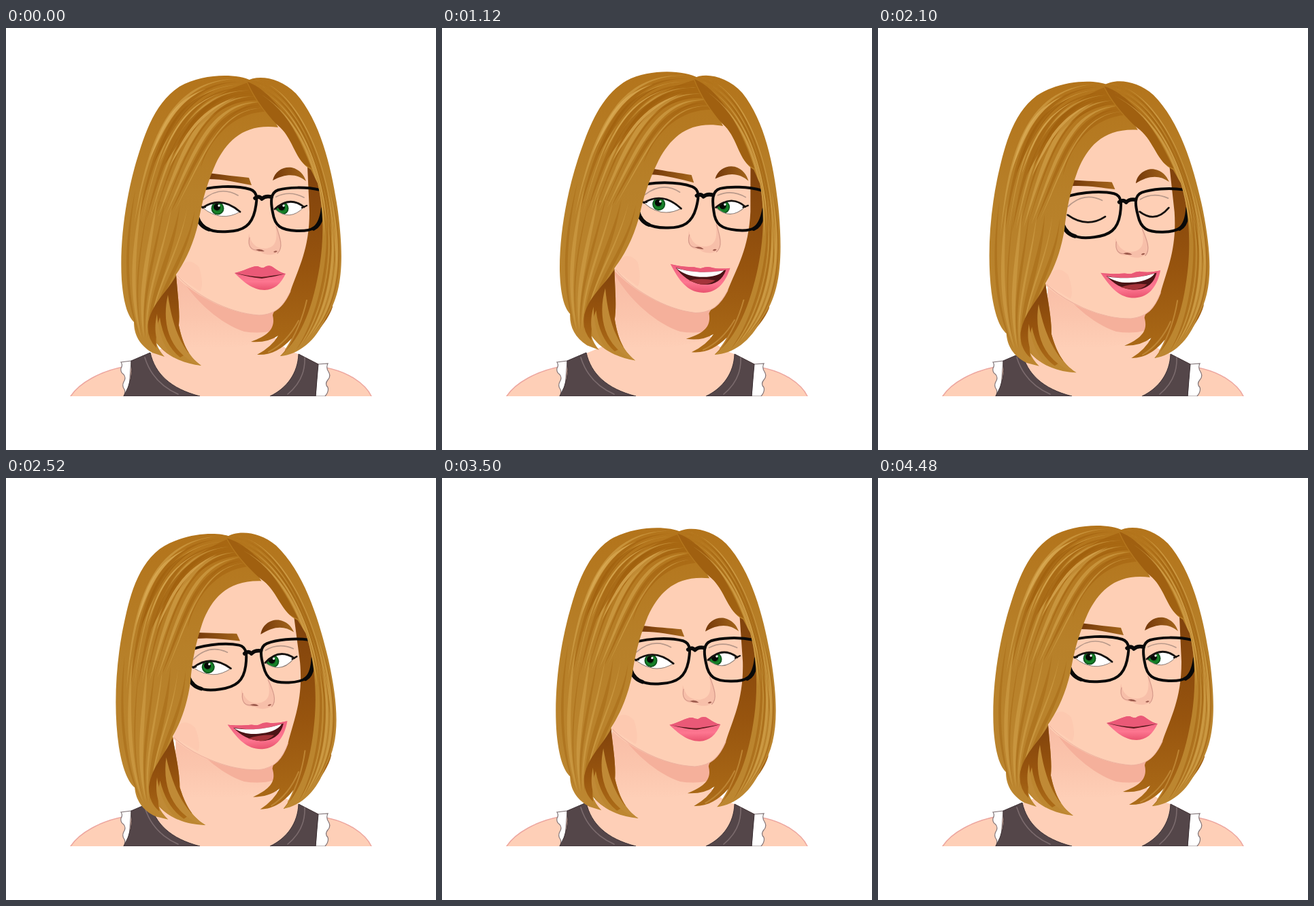
An HTML page for the animation above (5.25 s loop, 632x620 px).

```html
<!DOCTYPE html>
<html lang="en">
<head>
<meta charset="utf-8">
<title>Portrait</title>
<style>
html, body { margin: 0; height: 100%; overflow: hidden; background: #fff; }
svg { display: block; width: 100vw; height: 100vh; }
.line { fill: none; stroke-linecap: round; stroke-linejoin: round; }
</style>
</head>
<body>
<svg viewBox="0 0 632 620">
  <defs>
    <linearGradient id="hair" x1="0" y1="0" x2="0" y2="1">
      <stop offset="0" stop-color="#b3741b"/><stop offset=".4" stop-color="#b78029"/><stop offset="1" stop-color="#bd8731"/>
    </linearGradient>
    <linearGradient id="under" x1="0" y1="0" x2="0" y2="1">
      <stop offset="0" stop-color="#7f410c"/><stop offset=".55" stop-color="#97540e"/><stop offset="1" stop-color="#ac6c18"/>
    </linearGradient>
    <linearGradient id="brow"><stop offset="0" stop-color="#74380a"/><stop offset="1" stop-color="#a4661b"/></linearGradient>
    <linearGradient id="neck" x1="0" y1="0" x2="0" y2="1">
      <stop offset="0" stop-color="#f8bba4"/><stop offset=".6" stop-color="#fbc5ad"/><stop offset="1" stop-color="#fecfb7"/>
    </linearGradient>
    <linearGradient id="lip" x1="0" y1="0" x2="0" y2="1">
      <stop offset="0" stop-color="#f0617f"/><stop offset=".65" stop-color="#fd7690"/><stop offset="1" stop-color="#e9536f"/>
    </linearGradient>
    <radialGradient id="iris"><stop offset="0" stop-color="#0a3d14"/><stop offset=".65" stop-color="#178a2b"/><stop offset="1" stop-color="#0b4517"/></radialGradient>
    <path id="leftLock" d="M360,77C340,67 290,66 255,86C215,112 201,165 189,205C174,260 167,320 170,370C173,410 181,425 188,432C188,450 196,466 215,477L233,483Q224,473 221,463C235,480 257,493 287,496C266,481 259,460 254,437C256,415 252,390 250,362C262,345 275,320 283,285C288,255 295,230 308,200C325,165 350,140 400,146C390,125 372,108 360,77Z"/>
    <path id="rightLock" d="M353,78C370,68 402,72 426,96C465,140 480,215 488,270C497,340 495,390 470,426C455,460 430,480 403,482C436,455 452,405 461,350C468,305 466,262 458,228L448,208C425,195 423,165 403,146C385,130 368,112 353,78Z"/>
    <clipPath id="leftClip"><use href="#leftLock"/></clipPath>
    <clipPath id="rightClip"><use href="#rightLock"/></clipPath>
    <clipPath id="eyeClipL"><path id="eyeShapeL"/></clipPath>
    <clipPath id="eyeClipR"><path id="eyeShapeR"/></clipPath>
  </defs>

  <g id="body">
    <path fill="#fecfb7" d="M95,541C108,521 140,504 172,498L212,478L250,462V350H393V450Q402,470 430,479L470,499C502,505 528,522 537,541Z"/>
    <path fill="url(#neck)" d="M250,352H394V455C350,472 285,475 248,466Z"/>
    <path fill="#f5b09b" d="M250,355C272,398 315,435 350,446Q375,450 394,444V400Z"/>
    <path class="line" stroke="#eda7a0" stroke-width="1.5" d="M95,541C108,521 140,504 172,498M470,499C502,505 528,522 537,541"/>
    <path fill="#fff" stroke="#817477" stroke-width="1.2" d="M184,489L169,491Q172,495 169,500Q168,506 173,509Q177,514 173,520Q170,526 174,531Q176,536 173,541H180ZM458,494L473,493Q470,499 474,505Q478,512 473,517Q468,523 473,528Q475,534 469,541H455Z"/>
    <path fill="#544649" stroke="#3c3034" d="M184,489L212,477C219,508 242,530 285,541H173Q188,515 184,489ZM430,479L459,494Q457,515 455,541H388C413,529 429,507 430,479Z"/>
    <path class="line" stroke="#7b6b6d" stroke-width="1.6" d="M204,484C212,510 228,527 253,538M439,484C440,506 431,524 414,538"/>
    <path fill="#fff" d="M60,541H570V580H60Z"/>
  </g>

  <g id="head">
    <path fill="url(#under)" d="M440,195C468,215 480,300 480,410C470,440 430,478 403,482Q415,470 420,456C405,472 390,481 369,480Q391,468 400,452Q384,463 360,461C388,451 396,440 392,422C400,400 440,340 444,270Z"/>
    <path fill="#fecfb5" d="M245,360C270,388 322,419 372,422C396,421 408,409 418,387C430,352 446,325 446,270L443,203C430,165 415,140 380,138C330,138 290,190 275,280Z"/>
    <path class="line" stroke="#eeb19f" d="M252,364C275,390 325,419 372,422C396,421 408,409 418,387"/>
    <path fill="#fabfa9" opacity=".4" d="M252,364C258,340 272,338 284,352C290,372 288,384 285,387Z"/>

    <path fill="url(#brow)" d="M297,213C320,216 340,218 357,220L361,231C340,227 320,222 297,222Z"/>
    <path fill="url(#brow)" d="M392,224C395,210 408,203 420,205C432,208 438,216 441,225C428,214 412,213 392,224Z"/>
    <g class="line" stroke="#b8998a" stroke-width="1.7">
      <path d="M290,252Q315,231 341,246"/><path d="M397,248Q417,238 438,249"/>
    </g>
    <g id="eyes"></g>

    <path fill="#f5b9a4" opacity=".7" d="M357,302C354,325 362,329 374,329C384,336 397,334 403,326C407,314 398,300 396,290C400,312 396,322 382,324C368,325 360,317 357,302Z"/>
    <path class="line" stroke="#d5998a" stroke-width="1.2" d="M358,308C355,320 360,326 368,326M397,291C403,308 408,323 399,331"/>
    <path fill="#9c5a4c" d="M367,326Q374,323 380,328Q373,329 367,326ZM393,329Q396,326 399,328Q396,331 393,329Z"/>

    <g id="mouth"></g>

    <g class="line" stroke="#090909" stroke-width="4">
      <path d="M275,242C299,231 339,231 359,237C371,241 369,254 366,268C361,290 349,298 326,299C299,301 284,294 279,268Q275,254 277,242"/>
      <path d="M462,238C440,233 414,234 400,238C388,242 389,256 392,271C395,291 404,297 427,298C450,299 461,295 465,265"/>
      <path stroke-width="5.5" d="M366,250Q372,246 376,251Q381,246 390,248M281,277Q284,291 298,296M464,277Q461,291 452,295"/>
    </g>

    <use href="#leftLock" fill="url(#hair)"/>
    <g clip-path="url(#leftClip)">
      <path fill="#a4630f" opacity=".75" d="M356,80Q368,92 373,107C335,103 285,130 243,190C270,120 310,95 356,80Z"/>
      <path fill="#a4630f" opacity=".55" d="M392,123C345,120 305,150 286,205C298,160 330,110 380,108Z"/>
      <g id="leftStrands"></g>
      <path fill="url(#under)" d="M252,360C238,388 217,400 209,432Q206,455 221,470Q219,445 226,425Q232,465 256,484L270,476Q256,440 252,360Z"/>
      <path fill="#c08a36" d="M238,392C228,435 240,480 290,498C264,480 246,450 238,392ZM222,420C215,450 222,475 250,488C232,470 224,450 222,420Z"/>
    </g>
    <use href="#rightLock" fill="url(#hair)"/>
    <g clip-path="url(#rightClip)">
      <path fill="#9c5a0d" opacity=".8" d="M355,79C385,90 420,130 449,206C420,195 410,150 400,145C386,128 368,109 355,79Z"/>
      <g id="rightStrands"></g>
    </g>
    <path class="line" stroke="#bd8433" stroke-width="2" d="M430,430Q413,462 386,476M442,400Q433,440 411,473"/>
  </g>
</svg>
<script>
const $ = id => document.getElementById(id);
const clamp = v => Math.max(0, Math.min(1, v));

// Blend two paths that have the same structure.
function mix(a, b, u) {
  const to = b.match(/-?[\d.]+/g);
  let i = 0;
  return a.replace(/-?[\d.]+/g, n => (+n + (to[i++] - n) * u).toFixed(2));
}

function add(parent, d, fill, extra = "") {
  parent.insertAdjacentHTML("beforeend", `<path d="${d}" fill="${fill}" ${extra}/>`);
  return parent.lastElementChild;
}

// Tapered strands spread between two guide curves: start, two controls, end.
function strands(id, from, to, count, light, width, alpha) {
  for (let i = 0; i < count; i++) {
    const u = (i + .4) / count;
    const [x0, y0, x1, y1, x2, y2, x3, y3] = mix(from, to, u).split(" ").map(Number);
    const w = width * (.65 + .35 * Math.sin(i * 2.4));
    add($(id), `M${x0},${y0}C${x1},${y1} ${x2},${y2} ${x3},${y3}C${x2 + w},${y2 + w / 2} ${x1 + w},${y1 + w / 2} ${x0},${y0}Z`,
      i % 2 === light ? "#dcae57" : "#9f5f0d", `opacity="${alpha}"`);
  }
}
strands("leftStrands", "340 73 245 72 205 150 186 290", "384 120 315 118 295 190 250 270", 11, 0, 8, .5);
strands("leftStrands", "290 88 240 105 225 140 207 195", "345 103 290 120 265 160 245 205", 5, 0, 9, .75);
strands("leftStrands", "186 235 165 330 172 400 196 455", "284 270 270 340 222 380 214 455", 9, 1, 8, .4);
strands("rightStrands", "364 75 420 78 482 190 488 370", "370 96 425 130 462 210 466 300", 7, 0, 7, .6);
strands("rightStrands", "478 235 498 330 490 400 455 445", "466 250 478 320 460 420 424 475", 7, 1, 6, .5);

// Eyes: the upper lid's control point drops onto the lower lid's.
const eyes = [
  { side: "L", a: "289,264", b: "344,270", x: 316, top: 246, low: 286, iris: 311, lash: "M293,263Q288,264 284,261" },
  { side: "R", a: "395,266", b: "438,263", x: 417, top: 246, low: 285, iris: 406, lash: "M435,264L442,261" }
];
for (const e of eyes) {
  $("eyes").insertAdjacentHTML("beforeend", `<g clip-path="url(#eyeClip${e.side})">
    <path fill="#fff" d="M${e.iris - 40},235h90v50h-90Z"/>
    <circle cx="${e.iris}" cy="265" r="9.5" fill="url(#iris)"/><circle cx="${e.iris - 1}" cy="263" r="5" fill="#050805"/>
    <circle cx="${e.iris + 2}" cy="261" r="1.7" fill="#fff"/></g>`);
  e.edge = add($("eyes"), `M${e.b}Q${e.x},${e.low} ${e.a}`, "none", 'stroke="#8a7c76" stroke-width="1"');
  e.lid = add($("eyes"), "", "none", 'stroke="#161210" stroke-width="2.8" stroke-linecap="round"');
  e.wing = add($("eyes"), e.lash, "none", 'stroke="#161210" stroke-width="2.4" stroke-linecap="round"');
}

// Mouth layers: [closed path, open path, fill].
const shutTop = "M336,360C350,357 362,349 370,350Q376,353 379,352Q384,348 390,350C398,355 404,360 411,361";
const openTop = "M332,352C345,355 357,355 367,355Q375,357 378,356Q385,353 391,354C400,356 410,356 420,354";
const shutLine = "M336,360C355,364 365,365 376,366C388,364 400,363 411,361";
const mouth = [
  [shutTop + "C404,376 394,385 380,385C362,385 348,372 336,360Z",
   openTop + "C414,376 402,392 380,392C358,391 346,376 332,352Z", "url(#lip)"],
  [shutTop + "C400,363 388,364 376,366C365,365 355,364 336,360Z",
   openTop + "C404,360 390,362 376,362C362,362 350,360 332,352Z", "#ea5977"],
  [shutLine + "C400,364 388,366 376,368C365,367 355,365 336,360Z",
   "M340,357C355,361 365,362 376,362C390,362 400,360 414,357C409,374 396,381 379,380C362,378 350,369 340,357Z", "#4b1416"],
  [shutLine + "C400,363 388,364 376,366C365,365 355,364 336,360Z",
   "M341,358C355,361 365,362 376,362C390,362 400,360 411,358C405,366 392,369 376,369C362,369 352,366 341,358Z", "#fff"],
  ["M362,366Q376,366 390,365Q380,367 362,366Z", "M360,375Q377,370 399,373Q391,380 378,380Q367,379 360,375Z", "#a5333a"]
].map(([shut, open, fill]) => ({ shut, open, el: add($("mouth"), shut, fill) }));

// Head turn: [ms, radians].
const turns = [[140, 0], [1085, .046], [2480, -.087], [4060, 0]];
function turnAt(t) {
  for (let i = 1; i < turns.length; i++) {
    const [t0, a] = turns[i - 1], [t1, b] = turns[i];
    if (t < t1) return a + (b - a) * (1 - Math.cos(Math.PI * clamp((t - t0) / (t1 - t0)))) / 2;
  }
  return 0;
}

function draw(now) {
  const t = Math.floor(now % 5250 / 70) * 70;
  $("head").setAttribute("transform", `rotate(${turnAt(t) * 180 / Math.PI} 450 430)`);

  const open = Math.min(...[630, 2100].map(c => clamp((Math.abs(t - c) - 70) / 140)));
  for (const e of eyes) {
    const lid = `M${e.a}Q${e.x},${e.low + (e.top - e.low) * open} ${e.b}`;
    e.lid.setAttribute("d", lid);
    e.wing.setAttribute("opacity", open);
    $("eyeShape" + e.side).setAttribute("d", `${lid}Q${e.x},${e.low} ${e.a}Z`);
  }

  const speak = clamp((t - 140) / 350) * clamp((3430 - t) / 560);
  for (const m of mouth) m.el.setAttribute("d", mix(m.shut, m.open, speak));
}

const start = performance.now();
function tick() {
  draw(performance.now() - start);
  requestAnimationFrame(tick);
}
tick();
</script>
</body>
</html>
```
